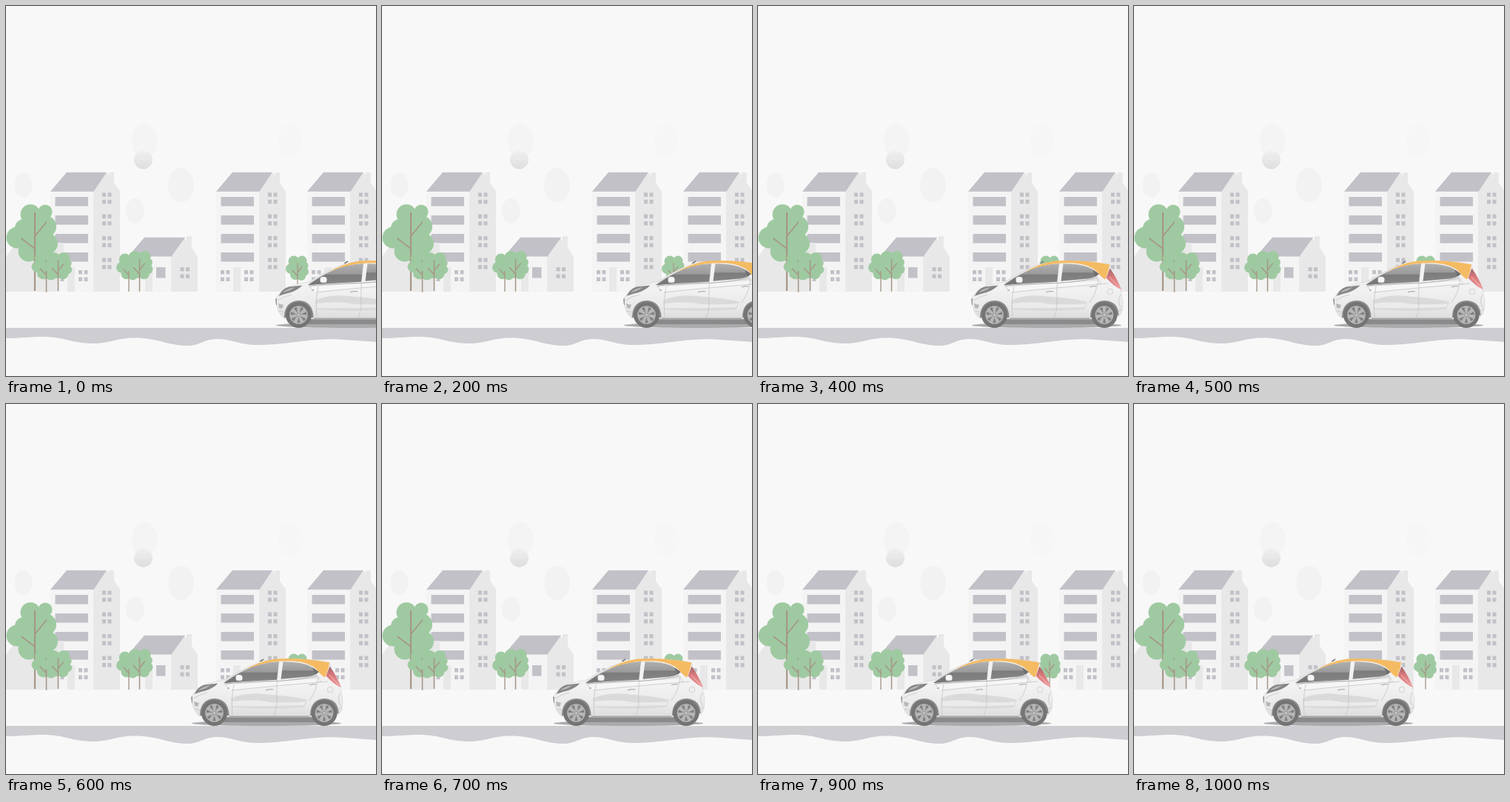
Animation, 500 px wide and 500 px high, one loop 1.1 s. Source, as an HTML page:

```html
<!DOCTYPE html>
<html lang="en">
<head>
<meta charset="utf-8">
<title>Car in town</title>
<style>
  html, body { margin: 0; width: 100%; height: 100%; overflow: hidden; background: #f8f8f8; }
  svg { display: block; width: 100vw; height: 100vh; }
  .front { fill: #f4f4f4; }
  .side { fill: #e8e8e8; }
  .slate { fill: #c2c1c8; }
  .leaf { fill: #9fcaa1; }
  .wood { fill: none; stroke: #a69687; stroke-width: 1.3; }
  .cloud { fill: #f2f2f2; }
  .seam { fill: none; stroke: #c4c4c4; stroke-width: .8; }
  .car { animation: drive 1100ms steps(11, end) infinite; }
  @keyframes drive {
    from { transform: translateX(364px); }
    to { transform: translateX(155px); }
  }
</style>
</head>
<body>
<svg viewBox="0 0 500 500">
  <defs>
    <linearGradient id="ball" x1="0" y1="0" x2="0" y2="1">
      <stop offset="0" stop-color="#efefef"/><stop offset="1" stop-color="#dedede"/>
    </linearGradient>
    <linearGradient id="paint" x1="0" y1="0" x2="0" y2="1">
      <stop offset="0" stop-color="#f3f3f3"/><stop offset=".5" stop-color="#f1f1f1"/>
      <stop offset=".8" stop-color="#e9e9e9"/><stop offset="1" stop-color="#dcdcdc"/>
    </linearGradient>
    <linearGradient id="glass" x1="0" y1="0" x2="0" y2="1">
      <stop offset="0" stop-color="#b0b0b0"/><stop offset=".48" stop-color="#9b9b9b"/>
      <stop offset=".54" stop-color="#7c7c7c"/><stop offset="1" stop-color="#858585"/>
    </linearGradient>
    <linearGradient id="lamp" x1="0" y1="0" x2="0" y2="1">
      <stop offset="0" stop-color="#9c6468"/><stop offset=".4" stop-color="#d9787b"/><stop offset="1" stop-color="#ee9c9c"/>
    </linearGradient>

    <path id="pane" d="M0 0h5v5.5h-5zM7.5 0h5v5.5h-5zM0 9.5h5v5.5h-5zM7.5 9.5h5v5.5h-5z" class="slate"/>

    <g id="block">
      <path class="front" d="M0 250H58V386H0z"/>
      <path class="side" d="M58 386V250L76 225L79 229V225H86V239L94 250.500V386zM23 353H33V386H23z"/>
      <path class="slate" d="M22 224.700H76L58.500 250.700H0zM6.500 258H51V270.500H6.500zM6.500 283H51V295.500H6.500zM6.500 308H51V320.500H6.500zM6.500 333H51V345.500H6.500z"/>
      <use href="#pane" x="6" y="357"/><use href="#pane" x="38" y="357"/>
      <use href="#pane" x="70" y="252.300"/><use href="#pane" x="70" y="281.600"/>
      <use href="#pane" x="70" y="311"/><use href="#pane" x="70" y="340.400"/>
    </g>

    <g id="tree">
      <g class="leaf">
        <circle cx="-5" cy="8" r="7.500"/><circle cx="6" cy="7" r="6.500"/>
        <circle cx="9" cy="14" r="5.500"/><circle cx="-9" cy="18" r="7"/>
        <circle cx="0" cy="18" r="9"/><circle cx="9" cy="22" r="6"/>
        <circle cx="-3" cy="26" r="7"/><circle cx="5" cy="28" r="6"/>
      </g>
      <path class="wood" d="M0 10V48.500M0 23L6 15M0 28L-7 20"/>
    </g>

    <g id="wheel">
      <circle r="17.500" fill="#747474"/>
      <circle r="12.300" fill="#b8b8b8"/>
      <circle r="10.800" fill="#7f7f7f"/>
      <path id="spoke" d="M-1 0L-2.800 -11.300H2.800L1 0z" fill="#b6b6b6"/>
      <use href="#spoke" transform="rotate(51.400)"/><use href="#spoke" transform="rotate(102.900)"/>
      <use href="#spoke" transform="rotate(154.300)"/><use href="#spoke" transform="rotate(205.700)"/>
      <use href="#spoke" transform="rotate(257.100)"/><use href="#spoke" transform="rotate(308.600)"/>
      <circle r="3" fill="#a2a2a2"/><circle r="1.500" fill="#c9c9c9"/>
    </g>
  </defs>

  <rect width="500" height="500" fill="#f8f8f8"/>

  <!-- sky -->
  <ellipse class="cloud" cx="23.500" cy="241.500" rx="12" ry="17"/>
  <ellipse cx="187" cy="182.500" rx="17.500" ry="23.500" fill="#f4f4f4"/>
  <ellipse cx="384" cy="182.500" rx="17" ry="23.500" fill="#f6f6f6"/>
  <ellipse class="cloud" cx="236.500" cy="242" rx="17.500" ry="23.500"/>
  <ellipse class="cloud" cx="174.500" cy="277" rx="12.500" ry="17"/>
  <circle cx="185.500" cy="208" r="12.500" fill="url(#ball)"/>
  <path d="M174 207H197" stroke="#ececec"/>

  <!-- town -->
  <use href="#block" x="60"/><use href="#block" x="284"/><use href="#block" x="407"/>
  <path class="side" d="M0 386V339L14 320H78V338L70 350V386z"/>
  <path class="front" d="M165 338H223V386H165z"/>
  <path class="side" d="M223 386V338L241 313L244 317V311H251V327L259 339V386zM188 353H198V386H188z"/>
  <path class="slate" d="M187 312.800H242L223.500 338.500H165zM203 353H215.500V367.500H203z"/>
  <use href="#pane" x="235.500" y="353"/>

  <g class="leaf">
    <circle cx="33" cy="281.500" r="13.500"/><circle cx="53" cy="278" r="9.500"/>
    <circle cx="53" cy="298" r="15"/><circle cx="24" cy="300" r="12"/>
    <circle cx="15" cy="313" r="14.500"/><circle cx="38" cy="308" r="20"/>
    <circle cx="56" cy="321" r="14"/><circle cx="31" cy="331" r="14.500"/><circle cx="46" cy="331" r="14"/>
  </g>
  <path class="wood" d="M39 279V385" style="stroke-width:2.200"/>
  <path class="wood" d="M39 311L55 291.500M39 328L20.500 314" style="stroke-width:1.700"/>
  <use href="#tree" transform="translate(54.500 332) scale(1.250 1.130)"/>
  <use href="#tree" transform="translate(70.500 332.500) scale(1.250 1.080)"/>
  <use href="#tree" transform="translate(166 334) scale(1.060 1.070)"/>
  <use href="#tree" transform="translate(180.500 330.500) scale(1.200 1.140)"/>
  <use href="#tree" transform="translate(394 337)"/>

  <!-- road -->
  <path fill="#cecdd2" d="M0 435H500V454C465 452 445 449 420 451C385 454 370 458 340 458C315 458 305 450 285 450C268 450 262 459 246 459C217 459 207 448.500 174 448.500C150 448.500 140 456 118 456C88 456 80 447 50 447C30 447 20 449 0 449z"/>

  <!-- car, nose at x = 0 -->
  <g class="car">
    <ellipse cx="102" cy="431.500" rx="101" ry="3.500" fill="#aaaaac"/>
    <path fill="#8b8b8c" d="M20 420H192V430H20z"/>
    <path fill="#777" d="M92 348L97 344.500L99 345L95 348z"/>
    <path fill="url(#paint)" stroke="#d2d2d2" stroke-width=".6" d="M1 395Q4 388 13 382Q23 376 45 373Q62 362 80 354Q98 346 125 344.500Q160 344 187 349.500L190 359Q201 374 202.500 386Q206 398 204.500 409Q203 418 196 422L160 423H52L12 422Q5 417 3 409Q0 402 1 395z"/>
    <path fill="#dadada" d="M54 398Q75 388 108 393Q140 395 157 400L153 410Q105 414 55 410z"/>
    <path fill="#ebebeb" d="M56 402Q85 398 108 403Q140 404 155 402L153 407Q100 409 56 408z"/>
    <path fill="#e1e1e1" d="M44 378Q90 374 118 374Q150 371 172 368L177 376Q150 378 118 380Q80 384 50 384z"/>
    <path fill="#f6f6f6" d="M48 379Q100 376 172 371L174 375Q140 381 52 386z"/>
    <path fill="none" stroke="#b0b0b0" stroke-width="1" d="M46 378Q90 374.500 118 374.500Q150 372 171 367"/>
    <path class="seam" d="M55 387Q110 381 185 375M118 348Q115 385 116 405Q115 416 112 421M58 379Q54 397 56 420M172 368Q170 388 160 401"/>
    <path fill="#a6a6a6" d="M52 421.500H160V424H52z"/>

    <path fill="#dedede" d="M45 374Q62 362 82 354L72 361L49 375z"/>
    <path fill="url(#glass)" d="M44 377Q58 367 72 360Q91 349.500 119 348L116 372.700Q75 374.500 44 377z"/>
    <path fill="#777" d="M44 377L60 368L70 375z"/>
    <path fill="url(#glass)" d="M124.500 348.300Q140 348 152 351Q164 354 172 362Q168 367 158 368.500L121.500 371.700z"/>
    <path fill="#6f6f6f" d="M164 356L173 362L168 366z"/>
    <path fill="#f5bb62" d="M72 360Q90 348 114 344.500Q150 342.500 187 349.300Q186 359 181 369.500Q175 366 170 359Q160 349 139 347.500Q100 346 72 360z"/>
    <path fill="url(#lamp)" d="M187.500 354.500Q196 366 203 383Q194 380 182.500 367.500z"/>
    <path fill="none" stroke="#f1bcbc" stroke-width="1" d="M187 366L200 380"/>

    <rect x="60.500" y="366" width="9" height="8" rx="3.500" fill="#f5f5f5"/>
    <path d="M61 374H69" stroke="#aaa" stroke-width=".8"/>
    <path fill="#868686" d="M4.500 392Q9 382 18 379.500L36.500 377.500Q30 384 21 387Q12 389 4.500 392z"/>
    <path fill="#b9b9b9" d="M10 387Q15 382 26 380Q21 385 10 387z"/>
    <path fill="#9a9a9a" d="M0 396L2 395V404L1 404z"/>
    <path fill="#b7b7b7" d="M4 402L11 404L9 409L5 408z"/>
    <path class="seam" d="M3 398Q12 392 22 390M5 412L13 414M202 390Q197 399 202 407M197 414L204 409"/>
    <path d="M101 386.500Q106 384.500 111 385.500M160 379.500Q165 377.500 169 378.500" fill="none" stroke="#b5b5b5" stroke-width="2"/>
    <path d="M101 385.500Q106 383.500 111 384.500M160 378.500Q165 376.500 169 377.500" fill="none" stroke="#f7f7f7" stroke-width="1"/>
    <circle cx="188" cy="386" r="4" fill="#eee" stroke="#cfcfcf" stroke-width=".8"/>
    <path d="M49 384H52" stroke="#aaa" stroke-width="1.500"/>

    <path fill="#898989" d="M12 421Q12 399 32 398Q51 399 51.500 421zM161 421Q161 399 180.500 398Q199 399 199.500 418z"/>
    <use href="#wheel" x="31.500" y="417.500"/>
    <use href="#wheel" x="180" y="417.500"/>
  </g>
</svg>
</body>
</html>
```
